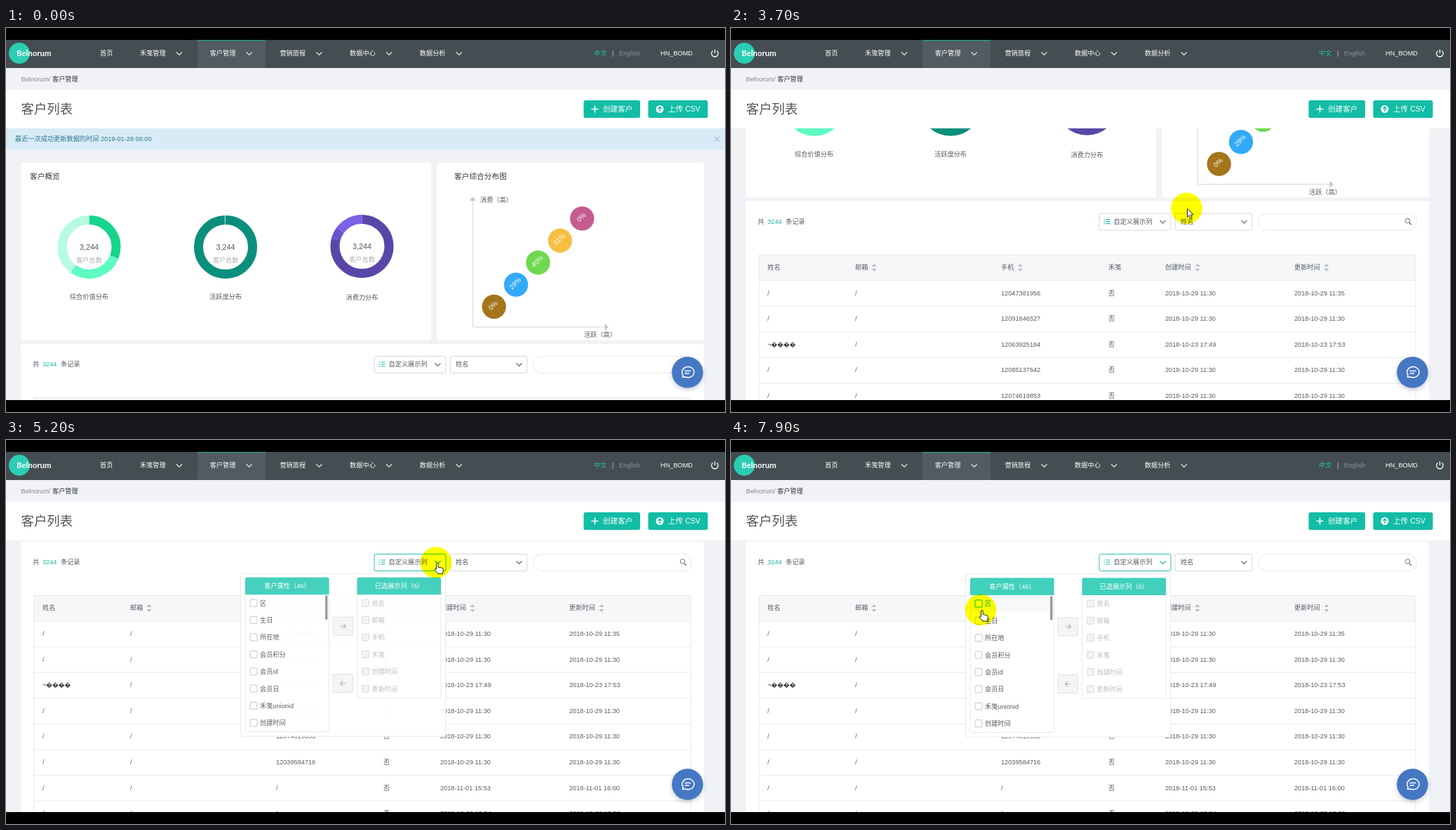
An HTML page for the animation above (8000 ms loop, 1025 by 547 pixels).

```html
<!DOCTYPE html>
<html lang="zh-CN">
<head>
<meta charset="utf-8">
<title>客户列表</title>
<style>
  html, body { margin: 0; width: 100%; height: 100%; overflow: hidden; background: #000; }
  svg { display: block; width: 1025px; height: 547px; }
  text { font-family: "Liberation Sans", "Noto Sans CJK SC", "Noto Sans CJK", sans-serif; white-space: pre; }
  #halo { mix-blend-mode: multiply; }
</style>
</head>
<body>
<svg id="stage" viewBox="0 0 1025 547" lang="zh-CN"></svg>
<script>
const LOOP = 8000, STEP = 100;
const TEAL = '#12bda6', INK = '#555b61', LINE = '#e6e9ec';

// Drawing helpers: each returns SVG markup. Text is centred on y.
const text = (x, y, s, fill = INK, size = 9.2, more = '') =>
  `<text x="${x}" y="${(y + size * .37).toFixed(2)}" font-size="${size}" fill="${fill}" ${more}>${s}</text>`;
const mid = (x, y, s, fill, size) => text(x, y, s, fill, size, 'text-anchor="middle"');
const rect = (x, y, w, h, fill, more = '') =>
  `<rect x="${x}" y="${y}" width="${w}" height="${h}" fill="${fill}" ${more}/>`;
const disc = (x, y, r, fill, more = '') => `<circle cx="${x}" cy="${y}" r="${r}" fill="${fill}" ${more}/>`;
const line = (d, stroke, width = 1, more = '') =>
  `<path d="${d}" fill="none" stroke="${stroke}" stroke-width="${width}" ${more}/>`;
const fillPath = (d, fill) => `<path d="${d}" fill="${fill}"/>`;
const chevron = (x, y, color, more = '') => line(`M${x - 4} ${y - 2}l4 4l4 -4`, color, 1.2, more);
const frame = (x, y, w, h, r, stroke = '#d3d8dc', more = '') =>
  rect(x, y, w, h, '#fff', `rx="${r}" stroke="${stroke}" ${more}`);

function ring(x, y, parts) {
  const r = 38.5, round = 2 * Math.PI * r;
  let from = 0;
  return parts.map(([share, color]) => {
    const arc = disc(x, y, r, 'none', `stroke="${color}" stroke-width="13"
      stroke-dasharray="${share * round} ${round}" transform="rotate(${from * 360 - 90} ${x} ${y})"`);
    from += share;
    return arc;
  }).join('');
}

function donut(x, y, label, labelY, parts) {
  return ring(x, y, parts) + mid(x, y, '3,244', '#50555a', 10.8) +
    mid(x, y + 18.5, '客户总数', '#a9adb1') + mid(x, labelY, label);
}

function navBar() {
  const names = ['禾笺管理', '客户管理', '营销旅程', '数据中心', '数据分析'];
  let s = rect(0, 17, 1025, 40, '#444d52') + rect(273, 17, 97, 40, '#525b61') +
    rect(273, 17, 97, 1.2, '#23a596');
  s += disc(19, 36, 15, '#2bcdb3') +
    `<text x="15" y="39.5" font-size="11.4" font-weight="700" fill="#fff" style="font-family:Lato,sans-serif">Belnorum</text>`;
  s += text(134, 36, '首页', '#fff');
  names.forEach((name, i) => {
    const x = 191 + 99.7 * i;
    s += text(x, 36, name, '#fff') + chevron(x + 56, 36.5, '#e8eaeb');
  });
  s += text(838, 36, '中文', '#20c2ab') + text(864, 36, '|', '#c8cccf') +
    text(874, 36, 'English', '#8c9498') + text(933, 36, 'HN_BOMD', '#fff');
  s += line('M1007.6 32.6a4.7 4.7 0 1 0 5.8 0M1010.5 30.5v5.5', '#fff', 1.3);
  return s;
}

function pageHead() {
  return rect(0, 57, 1025, 31, '#f0f2f6') + text(21.5, 72.5, 'Belnorum/', '#85898d') +
    text(66, 72.5, '客户管理', '#33373b') +
    rect(0, 88, 1025, 55, '#fff') + text(21.5, 115.5, '客户列表', '#50565b', 18.4) +
    rect(823.5, 103, 80.5, 25, TEAL, 'rx="2.5"') + rect(915.5, 103, 85, 25, TEAL, 'rx="2.5"') +
    line('M834.5 115.5h10M839.5 110.5v10', '#fff', 1.5) + text(851, 115.5, '创建客户', '#fff', 10.6) +
    disc(932, 115.5, 5.5, '#fff') + line('M932 119v-6.5M929.3 115l2.7 -2.7l2.7 2.7', TEAL, 1.4) +
    text(944, 115.5, '上传 CSV', '#fff', 10.6);
}

function overview() {
  let s = rect(0, 143, 1025, 30.5, '#d8ecf7') +
    text(13, 158, '最近一次成功更新数据的时间 2019-01-28 06:00', '#2f7390') +
    line('M1009.8 154.3l7.4 7.4M1017.2 154.3l-7.4 7.4', '#9dbccb', 1.1);
  s += rect(21, 192, 585, 252.5, '#fff', 'rx="2"') + rect(614, 192, 381, 252.5, '#fff', 'rx="2"') +
    text(34, 211, '客户概览', '#34383c', 10.7) + text(639, 211, '客户综合分布图', '#34383c', 10.7);
  s += donut(118.5, 312, '综合价值分布', 383, [[.31, '#17d48d'], [.29, '#5efbc2'], [.4, '#b7fbe3']]);
  s += donut(313, 312, '活跃度分布', 383, [[.995, '#0b8f7d'], [.005, '#9fe0d2']]);
  s += donut(507.5, 311, '消费力分布', 384, [[.79, '#5946a8'], [.062, '#6a53c9'], [.148, '#7a61e6']]);

  s += line('M665.5 245V426H855', '#d2d5d8') + line('M666 426L809 283', '#e6e8ea', .8) +
    fillPath('M660.5 246l5 -5.5l5 5.5z', '#c4c8cb') + fillPath('M853.5 421l5.5 5l-5.5 5z', '#c4c8cb') +
    text(676, 245, '消费（高）') + text(824, 436.5, '活跃（高）');
  [['0%', '#a5751c'], ['29%', '#33a9f9'], ['40%', '#70d850'], ['31%', '#f7bf44'], ['0%', '#c65b90']]
    .forEach(([label, color], i) => {
      const x = 695.7 + 31.4 * i, y = 397 - 31.4 * i;
      s += disc(x, y, 17.2, color) +
        `<g transform="rotate(-45 ${x - 1.5} ${y - 2})">${mid(x - 1.5, y - 2, label, '#fff', 9.6)}</g>`;
    });
  return s;
}

function sorter(x, y) {
  return fillPath(`M${x - 3.5} ${y - 1.5}l3.5 -4l3.5 4z`, '#b9bec3') +
    fillPath(`M${x - 3.5} ${y + 1.5}l3.5 4l3.5 -4z`, '#b9bec3');
}

function records() {
  let s = rect(21, 450, 974, 500, '#fff', 'rx="2"') + text(38, 479, '共') +
    text(52, 479, '3244', '#1bb5a2') + text(78, 479, '条记录');
  s += frame(525, 467.5, 102, 24, 2.5, '#d3d8dc', 'id="picker"') +
    line('M534.5 476h6M534.5 479h6M534.5 482h6M531.5 476h1.5M531.5 479h1.5M531.5 482h1.5', TEAL, 1.1) +
    text(545.5, 479, '自定义展示列') + chevron(615.5, 479.5, '#5f666c', 'id="pickerMark"');
  s += frame(633, 467.5, 110, 24, 2.5) + text(641, 479, '姓名') + chevron(731.5, 479.5, '#5f666c');
  s += frame(751.5, 467.5, 226, 24, 12, LINE) + disc(964.5, 478, 3.3, 'none', 'stroke="#6c7379"') +
    line('M967 480.7l3 3', '#6c7379', 1.4);

  const top = 526.5, head = 36.5, row = 36.6, y0 = top + head;
  s += rect(40, top, 936, head, '#f6f7f9') + rect(40, y0, 936, row, '#f4f6f8', 'id="rowHover" opacity="0"');
  s += line(`M40 ${top + 400}V${top}H976v400M40 ${y0}H976`, LINE);
  [[52, '姓名'], [177, '邮箱', 204], [385, '手机', 412.5], [538, '禾笺'],
   [619, '创建时间', 665], [803, '更新时间', 849]].forEach(([x, name, mark]) => {
    s += text(x, 544, name) + (mark ? sorter(mark, 544.5) : '');
  });
  const noon = '2018-10-29 11:30';
  [['12047381956', noon, '2018-10-29 11:35'], ['12091846527', noon, noon],
   ['12063925184', '2018-10-23 17:49', '2018-10-23 17:53'], ['12085137642', noon, noon],
   ['12074619853', noon, noon], ['12039584716', noon, noon],
   ['/', '2018-11-01 15:53', '2018-11-01 16:00'], ['/', '2018-10-29 12:24', '2018-10-29 12:30']]
    .forEach(([phone, made, changed], i) => {
      const y = 580.5 + row * i;
      s += (i === 2 ? text(52, y, '¬' + '\uFFFD'.repeat(4), '#2f3336', 8.8) : text(52, y, '/')) +
        text(177, y, '/') + text(385, y, phone) + text(538, y, '否') +
        text(619, y, made) + text(803, y, changed);
      s += line(`M40 ${y0 + row * (i + 1)}H976`, LINE);
    });
  return s;
}

const rowY = i => 233 + 24.4 * i;

function column(x, h, title, items, dim) {
  let s = frame(x, 197, 119.5, h, 2.5, LINE) +
    fillPath(`M${x} 221v-22q0 -2.5 2.5 -2.5h114.5q2.5 0 2.5 2.5v22z`, '#40d0bb') +
    mid(x + 60, 208.7, title, '#fff');
  if (!dim) s += rect(x + .5, 221, 113, 24.4, '#f7f8fa', 'id="itemHover" opacity="0"');
  items.forEach((name, i) => {
    const y = rowY(i), kind = dim ? '' : 'class="item"';
    s += `<g ${kind}>` + rect(x + 7, y - 5, 10, 10, dim ? '#f1f3f5' : '#fff',
      `rx="1" stroke="${dim ? '#d8dce0' : '#c3c9ce'}"`) +
      text(x + 21, y, name, dim ? '#b9bdc1' : INK) + '</g>';
  });
  return s;
}

function mover(y, d) {
  return rect(466, y, 28.5, 26, '#f3f5f7', 'rx="2" stroke="#dde1e5"') +
    line(`M476.5 ${y + 13}h8${d}`, '#aab0b6', 1.1);
}

function panel() {
  return frame(334.5, 191, 292, 232, 3, LINE) +
    column(341, 219.5, '客户属性（46）',
      ['区', '生日', '所在地', '会员积分', '会员id', '会员日', '禾笺unionid', '创建时间']) +
    rect(455, 222, 3.5, 35, '#9a9da0', 'rx="1.7"') +
    column(500.5, 171, '已选展示列（6）', ['姓名', '邮箱', '手机', '禾笺', '创建时间', '更新时间'], true) +
    mover(253, 'm-3.5 -3.5l3.5 3.5l-3.5 3.5') + mover(334.5, 'm-4.5 -3.5l-3.5 3.5l3.5 3.5');
}

function chat() {
  return disc(971.5, 493, 22.5, '#20365c', 'opacity=".25" filter="url(#soft)"') +
    disc(971.5, 490.5, 22.3, '#4677c2') +
    line('M964.5 497.5l.6 -3.2a8.6 7.6 0 1 1 3.6 2.8z', '#fff', 1.5, 'stroke-linejoin="round"') +
    line('M967.5 488.5h9M967.5 492h6.5', '#fff', 1.3);
}

const outline = 'fill="#fff" stroke="#222" stroke-width="1" stroke-linejoin="round"';
document.getElementById('stage').innerHTML = `
  <defs>
    <clipPath id="view"><rect y="143" width="1025" height="387"/></clipPath>
    <filter id="soft" x="-40%" y="-40%" width="180%" height="180%"><feGaussianBlur stdDeviation="3"/></filter>
  </defs>
  ${rect(0, 0, 1025, 547, '#000')}${rect(0, 143, 1025, 387, '#f0f2f6')}
  <g clip-path="url(#view)"><g id="page">${overview()}${records()}</g></g>
  ${navBar()}${pageHead()}
  <g id="panel">${panel()}</g>
  ${chat()}
  <circle id="halo" r="22.3" fill="#ffff00"/>
  <g id="arrow"><path d="M.5 .5V12.5L3.3 10L5.3 14.3L7.3 13.4L5.4 9.2H9z" ${outline}/></g>
  <g id="hand"><path d="M0 2q0 -1.5 1.3 -1.5t1.3 1.5v4.5l5.5 1.2q2 .5 1.8 2.5l-.8 5.8h-6.6l-4.3 -5.2q-.8 -1.8 .6 -1.9l1.2 .9z" ${outline}/></g>`;

// Motion tables: time, then values
const SCROLL = [[3100, 0], [3200, 8.5], [3300, 42], [3900, 284], [4000, 305]];
const FADE = [[5000, 0], [5100, .55], [5200, .97], [5300, 1]];
const PATH = [
  [1800, 643.5, 245], [1900, 612, 203], [2000, 640, 228], [2100, 656, 250],
  [2300, 656, 250], [2400, 700, 300], [2500, 785, 373], [2600, 710, 310], [2700, 649.5, 254.5],
  [2900, 649.5, 255], [3000, 649.5, 256.3], [3900, 649.5, 257], [4000, 649.5, 257.5],
  [4200, 665, 390], [4400, 668, 485], [4600, 645, 370], [4800, 618, 205], [4900, 613, 174.5],
  [5600, 613, 174.5], [5900, 530, 235], [6200, 452, 244.5], [6500, 455, 238],
  [6700, 456, 237], [6900, 456, 236], [7300, 458.5, 233], [7400, 458.5, 233],
  [7500, 462, 230], [7700, 410, 245], [7900, 356, 242]
];

function at(keys, t) {
  if (t <= keys[0][0]) return keys[0].slice(1);
  for (let i = 1; i < keys.length; i++) {
    const [a, ...from] = keys[i - 1], [b, ...to] = keys[i];
    if (t <= b) return from.map((v, k) => v + (to[k] - v) * (t - a) / (b - a));
  }
  return keys[keys.length - 1].slice(1);
}

const el = id => document.getElementById(id);
const parts = {};
['page', 'panel', 'halo', 'arrow', 'hand', 'picker', 'pickerMark', 'rowHover', 'itemHover']
  .forEach(id => parts[id] = el(id));
const items = [...document.querySelectorAll('.item')];
const set = (node, name, value) => node.setAttribute(name, value);
const show = (node, on) => set(node, 'opacity', on ? 1 : 0);

function draw(t) {
  const [x, y] = at(PATH, t), [scroll] = at(SCROLL, t), [fade] = at(FADE, t);
  const open = t >= 5000, seen = t >= 1800;

  set(parts.page, 'transform', `translate(0 ${-scroll})`);
  set(parts.panel, 'opacity', fade);
  set(parts.panel, 'transform', `translate(0 ${t < 5300 ? -.8 : 0})`);
  set(parts.picker, 'stroke', open ? '#2cbfab' : '#d3d8dc');
  set(parts.pickerMark, 'stroke', open ? TEAL : '#5f666c');

  const row = Math.floor((y - 258) / 36.6);
  show(parts.rowHover, t > 4000 && !open && row >= 0);
  set(parts.rowHover, 'y', 563 + 36.6 * row);

  const over = t > 5600 && x > 341 && x < 453 ? Math.floor((y + 1 - 221) / 24.4) : -1;
  items.forEach((g, i) => {
    set(g.firstChild, 'stroke', i === over ? TEAL : '#c3c9ce');
    set(g.lastChild, 'fill', i === over ? TEAL : INK);
  });
  show(parts.itemHover, over >= 0 && x < 450);
  set(parts.itemHover, 'y', 221 + 24.4 * over);

  const pointing = (t >= 4900 && t < 5700) || (over >= 0 && x < 450);
  show(parts.halo, seen);
  show(parts.arrow, seen && !pointing);
  show(parts.hand, seen && pointing);
  set(parts.halo, 'transform', `translate(${x} ${y})`);
  set(parts.arrow, 'transform', `translate(${x + .5} ${y})`);
  set(parts.hand, 'transform', `translate(${x + .5} ${y})`);
}

const start = performance.now();
function tick() {
  const t = (performance.now() - start) % LOOP;
  draw(Math.floor(t / STEP) * STEP);
  requestAnimationFrame(tick);
}
tick();
</script>
</body>
</html>
```
